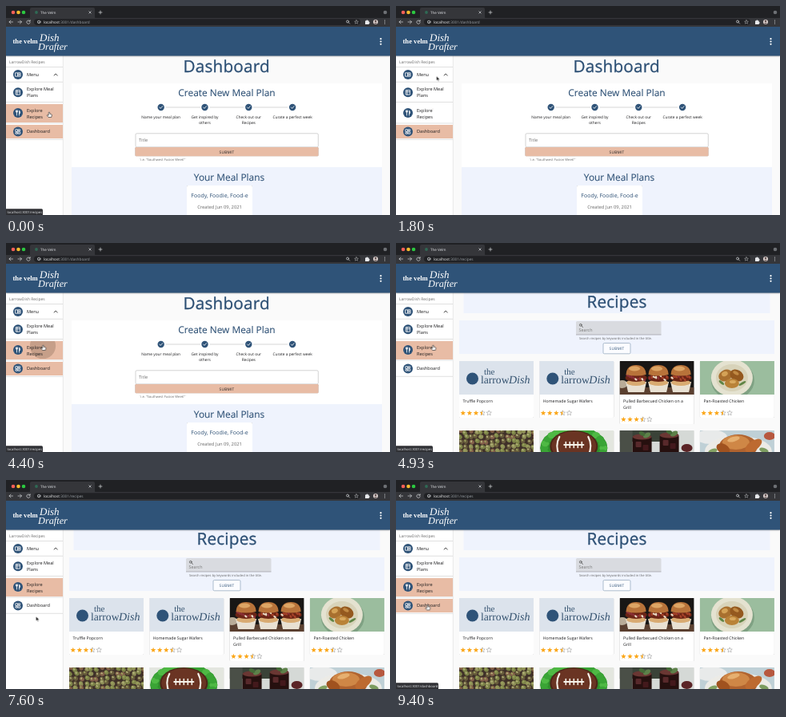
These frames come from a looping animation (480x262 px, 9.99 s). An HTML page:

```html
<!DOCTYPE html>
<html lang="en">
<head>
<meta charset="utf-8">
<title>Meal plan dashboard</title>
<style>
html, body { margin: 0; width: 100%; height: 100%; overflow: hidden; background: #fafafa; }
#stage { display: block; width: 100vw; height: 100vh; }
text { font-family: "Open Sans", "Noto Sans", sans-serif; font-size: 5px; fill: #1c1c1e; text-rendering: geometricPrecision; white-space: pre; }
.mid { text-anchor: middle; }
.h1 { font-size: 20.7px; letter-spacing: .2px; fill: #2c4f74; stroke: #2c4f74; stroke-width: .3px; }
.h2 { font-size: 11.9px; fill: #2c4f74; stroke: #2c4f74; stroke-width: .1px; }
.nav text { font-size: 5.6px; font-weight: 500; }
.nav .note { font-size: 4.9px; font-weight: 400; fill: #666; }
.step { font-size: 4.85px; font-weight: 500; }
.small { font-size: 4.1px; fill: #666; }
.btn { font-size: 4.8px; letter-spacing: .22px; font-weight: 500; }
.card { font-size: 5.2px; font-weight: 500; }
.serif { font-family: "Liberation Serif", "Noto Serif", serif; }
.script { font-family: "Liberation Serif", "Noto Serif", serif; font-style: italic; }
.url { font-size: 4.75px; fill: #9aa0a6; }
.url tspan { fill: #f1f3f4; }
.peach { fill: #e8bca5; }
.blue { fill: #2f5378; }
.white { fill: #fff; }
.pale { fill: #eff3fd; }
.line { fill: none; stroke-linecap: round; stroke-linejoin: round; }
.shade { filter: drop-shadow(0 .5px .7px #0005); }
</style>
</head>
<body>
<svg id="stage" viewBox="0 0 480 262" preserveAspectRatio="none">
  <defs>
    <path id="star" d="M0-4 1.1-1.3 4-1.1 1.8.8 2.5 3.7 0 2.1-2.5 3.7-1.8.8-4-1.1-1.1-1.3Z"/>
    <clipPath id="half"><path d="M-5-5H0V5H-5Z"/></clipPath>
    <clipPath id="item"><path d="M0 123H71V146H0Z"/></clipPath>
  </defs>

  <rect width="480" height="262" fill="#fafafa"/>

  <g class="dash">
    <text class="h1 mid" x="275.7" y="82.5">Dashboard</text>
    <g class="shade"><rect class="white" x="82" y="97" width="388" height="170"/></g>
    <rect class="pale" x="82" y="202" width="388" height="60"/>
    <text class="h2 mid" x="276" y="112.5">Create New Meal Plan</text>
    <path d="M200 127H243M255 127H297M309 127H352" stroke="#bdbdbd" stroke-width=".6"/>
    <g id="steps"></g>
    <rect class="white" x="162" y="159.8" width="228.3" height="17" rx="1.5" stroke="#b5b5b5" stroke-width=".6"/>
    <text x="166" y="170" style="font-size:5.6px;fill:#6d6d6d">Title</text>
    <g class="shade"><rect class="peach" x="161.5" y="177" width="229" height="11.3" rx="1.2"/></g>
    <text class="btn mid" x="276" y="184.6">SUBMIT</text>
    <text class="small" x="166" y="193.6">`i.e. "Southwest Fusion Week"`</text>
    <text class="h2 mid" x="279" y="218.5">Your Meal Plans</text>
    <g class="shade"><rect class="white" x="226" y="225" width="82" height="45" rx="1.5"/></g>
    <text class="mid" x="267" y="240" style="font-size:7px;fill:#2c4f74">Foody, Foodie, Food-e</text>
    <text class="mid" x="267" y="254" style="font-size:5.8px;fill:#666">Created Jun 09, 2021</text>
  </g>

  <g class="recipes">
    <rect class="pale" x="84.5" y="62" width="383" height="26"/>
    <text class="h1 mid" x="276" y="81">Recipes</text>
    <rect class="pale" x="79" y="97" width="394" height="42"/>
    <path d="M225 115V99.5Q225 98 226.5 98H330Q331.5 98 331.5 99.5V115Z" fill="#d9dbe0"/>
    <path d="M225 115H331.5" stroke="#8d8f94" stroke-width=".6"/>
    <g class="line" stroke="#555" stroke-width=".8"><circle cx="230.8" cy="102.8" r="1.4"/><path d="M232 104 233.6 105.6"/></g>
    <text x="228.5" y="110.8" style="font-size:5.4px;fill:#777">Search</text>
    <text class="small" x="229" y="120.7">Search recipes by keywords included in the title.</text>
    <rect x="259" y="125.5" width="34" height="13.3" rx="1.5" fill="#fbfcff" stroke="#8fa4b9" stroke-width=".7"/>
    <text class="btn mid" x="276" y="133.8" style="fill:#2f5378">SUBMIT</text>
    <g id="cards"></g>
  </g>

  <g class="nav">
    <rect class="white" y="60" width="71" height="202"/>
    <path d="M71.3 60V262" stroke="#ddd" stroke-width=".6"/>
    <text class="note" x="4" y="72">LarrowDish Recipes</text>
    <path d="M0 76.5H71M0 95.3H71M0 120.5H71M0 147H71M0 167.3H71" stroke="#d3d3d3" stroke-width=".7"/>
    <rect class="peach hoverPlans" y="97" width="71" height="22.5"/>
    <rect class="peach hoverRecipes" y="123" width="71" height="23"/>
    <rect class="peach hoverDash" y="149" width="71" height="17"/>
    <g clip-path="url(#item)"><circle class="ripple" cx="46" cy="129" fill="#6b5340"/></g>
    <g id="icons"></g>
    <text x="26" y="88">Menu</text>
    <text x="26" y="106">Explore Meal</text><text x="26" y="114">Plans</text>
    <text x="26" y="132.5">Explore</text><text x="26" y="140.5">Recipes</text>
    <text x="26" y="159.2">Dashboard</text>
    <path class="line" d="M60.2 87 62.2 85 64.2 87" stroke="#222" stroke-width=".9"/>
  </g>

  <g style="filter:drop-shadow(0 .6px 1px #0007)"><rect class="blue" y="25" width="480" height="37.5"/></g>
  <text class="serif white" x="8.5" y="47" style="font-size:8.6px;font-weight:bold;fill:#fff">the velm</text>
  <g style="--ink:#fff">
    <text class="script" x="42" y="44" style="font-size:13px;fill:#fff">Dish</text>
    <text class="script" x="40" y="54.8" style="font-size:12.3px;fill:#fff">Drafter</text>
  </g>
  <g class="white"><circle cx="468.5" cy="41.2" r="1.1"/><circle cx="468.5" cy="44.5" r="1.1"/><circle cx="468.5" cy="47.8" r="1.1"/></g>

  <g>
    <rect width="480" height="16" fill="#202124"/>
    <path d="M28 16Q30 16 30 14V4Q30 2 32 2H109Q111 2 111 4V14Q111 16 113 16Z" fill="#35363a"/>
    <rect y="15" width="480" height="11" fill="#35363a"/>
    <circle cx="9" cy="8" r="2.3" fill="#f45f57"/><circle cx="15.5" cy="8" r="2.3" fill="#f8bd2e"/><circle cx="22" cy="8" r="2.3" fill="#2bc840"/>
    <circle cx="38" cy="8" r="1.9" fill="#2f6a55"/>
    <text x="43" y="9.9" style="font-size:4.5px;fill:#e8eaed">The Velm</text>
    <circle cx="474" cy="8" r="2.3" fill="#6d7074"/>
    <rect x="35" y="16.3" width="408" height="7.6" rx="3.8" fill="#202124"/>
    <g class="line" stroke="#d6d8db" stroke-width=".7">
      <path d="M103.8 6.8 106.2 9.2M106.2 6.8 103.8 9.2M116 8H120M118 6V10M8.5 20H4M6 18 4 20 6 22"/>
      <path d="M15 20H19.5M17.5 18 19.5 20 17.5 22"/>
      <path d="M29.7 18.7A2.2 2.2 0 1 0 30.2 20.7M30.2 17.7V19.2H28.7"/>
      <circle cx="41.2" cy="20" r="1.8"/><path d="M41.2 20V21"/>
      <circle cx="427" cy="19.5" r="1.5"/><path d="M428.2 20.7 429.6 22.1"/>
      <use href="#star" transform="translate(438 20)scale(.6)"/>
    </g>
    <text class="url dash" x="47" y="21.8"><tspan>localhost</tspan>:3001/dashboard</text>
    <text class="url recipes" x="47" y="21.8"><tspan>localhost</tspan>:3001/recipes</text>
    <path d="M449 18.5H450.4A1 1 0 0 1 452.4 18.5H453.7V20A1 1 0 0 1 453.7 22V23H449Z" fill="#e8eaed"/>
    <circle cx="462" cy="20" r="3" fill="#d9cfcc"/><path d="M460 22.2Q462 19.8 464 22.2Z" fill="#5b4a4a"/><circle cx="462" cy="19" r="1.2" fill="#5b4a4a"/>
    <g fill="#d6d8db"><circle cx="473.5" cy="18" r=".6"/><circle cx="473.5" cy="20" r=".6"/><circle cx="473.5" cy="22" r=".6"/></g>
  </g>

  <g id="status"></g>

  <g class="cursor">
    <path class="hand" d="M-.8.5Q0-.5.8.5V2.3L2.8 2.8Q3.5 3 3.3 4L2.7 6.5H-1L-2.8 4.2Q-2.6 3.2-1.7 3.8L-.8 4.3Z" fill="#fff" stroke="#222" stroke-width=".6"/>
    <path class="arrow" d="M0 0V5.6L1.3 4.5 2.2 6.4 3.1 6 2.3 4.2H4Z" fill="#111" stroke="#fff" stroke-width=".5"/>
  </g>
</svg>

<script>
const LOOP = 9990;
const $ = id => document.getElementById(id);
const sheet = document.head.appendChild(document.createElement("style"));

// keys: [ms, declarations]
function animate(name, keys, easing = "linear") {
  const body = keys.map(([t, css]) => `${(t / LOOP * 100).toFixed(3)}%{${css}}`).join("");
  sheet.textContent += `@keyframes ${name}{${body}}.${name}{animation:${name} ${LOOP}ms ${easing} infinite}`;
}

// Visible in each [from, to) span
function show(name, ...spans) {
  const keys = [[0, "opacity:0"]];
  for (const [from, to] of spans) {
    if (from === 0) keys.pop();
    keys.push([from, "opacity:1"], [to, `opacity:${to === LOOP ? 1 : 0}`]);
  }
  if (keys.at(-1)[0] < LOOP) keys.push([LOOP, "opacity:0"]);
  animate(name, keys, "step-end");
}

show("dash", [0, 4600]);
show("recipes", [4600, LOOP]);
show("hoverPlans", [200, 1130], [1930, 2060]);
show("hoverRecipes", [0, 200], [2060, LOOP]);
show("hoverDash", [0, 4600], [6670, 6870], [8470, LOOP]);
show("statusRecipes", [0, 330], [2470, 7070]);
show("statusPlans", [330, 1400]);
show("statusDash", [8600, LOOP]);
show("hand", [0, 1060], [1930, 6870], [8470, LOOP]);
show("arrow", [1060, 1930], [6870, 8470]);

const path = [
  [0, 54, 133], [70, 54, 133], [300, 55, 115], [530, 55, 107], [730, 55, 107],
  [1070, 53, 96], [1400, 52, 80], [1670, 51, 79], [1730, 51, 79], [2060, 49, 120],
  [2330, 46.5, 132], [3070, 46.5, 132], [3400, 45, 126], [3700, 48, 131],
  [4000, 46.5, 128], [6470, 46.5, 128], [6600, 40.5, 146.5], [6870, 38, 166],
  [7130, 37.5, 171], [8300, 37.5, 171], [8530, 39.5, 159], [8800, 39.5, 156.5], [LOOP, 39.5, 156.5]
];
animate("cursor", path.map(([t, x, y]) => [t, `transform:translate(${x}px,${y}px)`]));
animate("ripple", [
  [0, "r:0;opacity:0"], [4200, "r:2px;opacity:.27"], [4400, "r:16px;opacity:.27"],
  [4600, "r:40px;opacity:.2"], [4900, "r:50px;opacity:0"], [LOOP, "r:0;opacity:0"]
]);

const text = (x, y, s, cls) => `<text x="${x}" y="${y}" class="${cls}">${s}</text>`;
const rect = (x, y, w, h, fill, more = "") => `<rect x="${x}" y="${y}" width="${w}" height="${h}" fill="${fill}" ${more}/>`;
const oval = (x, y, rx, ry, fill, turn = 0) =>
  `<ellipse cx="${x}" cy="${y}" rx="${rx}" ry="${ry}" fill="${fill}" transform="rotate(${turn} ${x} ${y})"/>`;
const stroke = (d, color, width) => `<path class="line" d="${d}" stroke="${color}" stroke-width="${width}"/>`;
const each = (n, f) => Array.from({ length: n }, (_, i) => f(i)).join("");

let seed = 7;
const rnd = () => (seed = seed * 16807 % 2147483647) / 2147483647;
const pick = list => list[Math.floor(rnd() * list.length)];

// Stepper
$("steps").innerHTML = [
  ["Name your meal plan"], ["Get inspired by", "others"], ["Check out our", "Recipes"], ["Curate a perfect week"]
].map((lines, i) => {
  const x = 193.7 + i * 54.8;
  return `<circle class="blue" cx="${x}" cy="127" r="4.2"/>` +
    stroke(`M${x - 1.8} 127l1.3 1.4 2.5-2.8`, "#fff", .8) +
    lines.map((s, j) => text(x, 141 + j * 7, s, "step mid")).join("");
}).join("");

// Sidebar icons
const glyphs = [
  [86, "M-3-2.2H-.3V2.2H-3ZM.3-2.2H3V2.2H.3ZM1-.8H2.3M1 .6H2.3"],
  [108.3, "M-2.4-2.8H2.4V2.8H-2.4ZM-2.4-.7H2.4M-1-2.8V2.8"],
  [134, "M-1.5-3V3M-2.5-3V-1Q-1.5.5-.5-1V-3M1.5 3V-3Q3-2 2.5.5H1.5"],
  [157.5, "M-2.7-2.7H-.5V0H-2.7ZM.6-2.7H2.7V-1H.6ZM-2.7 1.2H-.5V2.7H-2.7ZM.6.3H2.7V2.7H.6Z"]
];
$("icons").innerHTML = glyphs.map(([y, d]) =>
  `<g transform="translate(15 ${y})"><circle class="blue" r="6"/>${stroke(d, "#fff", .8)}</g>`).join("");

// Status bubbles
$("status").innerHTML = [["Recipes", "recipes", 46], ["Plans", "meal_plans", 54], ["Dash", "dashboard", 53]]
  .map(([name, page, w]) => `<g class="status${name}"><path d="M0 254.3H${w - 1.5}Q${w} 254.3 ${w} 256V262H0Z" fill="#303135"/>` +
    `<text x="1.5" y="260" style="font-size:4.2px;fill:#e4e6e9">localhost:3001/${page}</text></g>`).join("");

// Recipe pictures, drawn in a 93 by 42 box
const brand = () => rect(0, 0, 93, 42, "#dce3ec") +
  `<circle class="blue" cx="16.5" cy="22" r="7.5"/>` +
  `<text class="serif" x="31" y="17" style="font-size:11px;fill:#34526f">the</text>` +
  `<text class="serif" x="27" y="28" style="font-size:13.6px;fill:#34526f">larrow</text>` +
  `<text class="script" x="62" y="28" style="font-size:14px;fill:#34526f">Dish</text>`;

const sliders = () => rect(0, 0, 93, 42, "#181615") + rect(0, 33, 93, 9, "#5b4030") +
  oval(3, 29, 7, 5, "#b9ac98") +
  each(3, i => {
    const x = 20.5 + i * 28;
    return `<path d="M${x - 13} 26H${x + 13}L${x + 10} 39H${x - 10}Z" fill="#e9e1d3"/>` +
      oval(x, 27, 12, 4, "#d9ab72") + oval(x, 21, 13.5, 5, "#6b2415") +
      each(9, j => oval(x - 11 + j * 2.7, 18 + rnd() * 6, 2, 1.2, pick(["#ead9c4", "#a8432a", "#8c2f38"]), rnd() * 90)) +
      `<path d="M${x - 12.5} 17Q${x - 12} 5 ${x} 5T${x + 12.5} 17Q${x} 20 ${x - 12.5} 17Z" fill="#b8733a"/>` +
      oval(x - 2, 9.5, 7, 3, "#dda565");
  });

const roast = () => rect(0, 0, 93, 42, "#9bbd9e") + oval(41, 24, 27, 24, "#7fa183") +
  oval(40, 21, 26, 23, "#e4e2d0") + oval(40, 21, 20, 17, "#d8d3ba") +
  oval(32, 18, 9, 7, "#a9702f", -25) + oval(46, 18, 9, 7, "#94591f", 30) + oval(40, 28, 9, 6, "#b98238") +
  oval(31, 16, 4, 3, "#d4a257", -25) + oval(45, 15, 4, 2, "#c18a44", 30) + oval(41, 26, 4, 2, "#d9a95f") +
  oval(27, 27, 4, 1.5, "#5f8444", 40) + oval(53, 28, 5, 1.5, "#5f8444", -30);

const sprouts = () => rect(0, 0, 93, 42, "#3f3029") + each(75, i => {
  const x = i % 15 * 6.6 + rnd() * 3, y = Math.floor(i / 15) * 6 + rnd() * 3;
  return oval(x, y, 3.2, 2.7, pick(["#7d8448", "#8f9058", "#675b3c", "#84604a"]), rnd() * 90) +
    oval(x - .7, y - .8, 1.4, 1, pick(["#b3b07a", "#9aa25c"]), rnd() * 90);
});

const football = () => rect(0, 0, 93, 42, "#e3e6df") + oval(43, 22, 42, 27, "#2f8f2c") +
  each(26, i => oval(43 + 37 * Math.cos(i / 26 * 6.283), 22 + 24 * Math.sin(i / 26 * 6.283), 5, 4, pick(["#4fb944", "#3aa435"]))) +
  oval(43, 20, 30, 20, "#4b2418") + oval(43, 19.5, 28, 18.5, "#6a3423") +
  stroke("M25 8Q19 19 25 32M61 8Q67 19 61 32M31 18H55", "#f5f2e9", 2.2) +
  each(5, i => stroke(`M${33 + i * 5} 14.5V21.5`, "#f5f2e9", 1.6));

const drinks = () => rect(0, 0, 93, 42, "#d5d9d6") + rect(0, 0, 60, 14, "#3a4238") + rect(0, 0, 16, 42, "#4a4f47") +
  [[28, 6], [62, 4]].map(([x, y]) =>
    rect(x - 12, y, 24, 34, "#26100f", 'rx="4"') + oval(x, y + 2, 12, 3.5, "#6a3733") +
    rect(x - 8, y + 8, 7, 7, "#58292b", 'rx="1"') + rect(x + 1, y + 12, 7, 7, "#43191c", 'rx="1"') +
    oval(x + 6, y, 5, 3, "#5d8149", -30) + oval(x, y - 2, 4, 2.5, "#456b38", 25)).join("") +
  oval(84, 22, 7, 5, "#5b2426");

const chicken = () => rect(0, 0, 93, 42, "#bfd0d6") + oval(14, 8, 20, 9, "#e8eaea") +
  oval(48, 26, 42, 19, "#ecebe6") + oval(48, 20, 24, 15, "#b0632f") + oval(45, 15, 17, 9, "#cf8746") +
  oval(67, 19, 12, 6, "#bd6a30", -35) + oval(29, 23, 9, 6, "#a0521f", 30) + oval(42, 11, 8, 3, "#e6b070", -15) +
  oval(80, 25, 6, 3, "#7c9c60", 20) + oval(16, 26, 6, 3, "#84a264", -20) + oval(87, 7, 7, 5, "#b7583f");

const stars = (x, y) => each(5, i => {
  const at = `transform="translate(${x + i * 8.1} ${y})scale(.8)"`;
  if (i < 3) return `<use href="#star" ${at} fill="#fba81c"/>`;
  const outline = `<use href="#star" ${at} fill="none" stroke="#8a8a8a" stroke-width=".6"/>`;
  return outline + (i === 3 ? `<g ${at}><use href="#star" clip-path="url(#half)" fill="#fba81c"/></g>` : "");
});

const cards = [
  [brand, "Truffle Popcorn"], [brand, "Homemade Sugar Wafers"],
  [sliders, "Pulled Barbecued Chicken on a", "Grill"], [roast, "Pan-Roasted Chicken"],
  [sprouts], [football], [drinks], [chicken]
];
$("cards").innerHTML = cards.map(([picture, ...lines], i) => {
  const x = 79 + i % 4 * 100.3, y = i < 4 ? 148 : 235, extra = lines.length > 1 ? 8 : 0;
  return `<g class="shade">${rect(x, y, 93, 71 + extra, "#fff", 'rx="1.5"')}</g>` +
    `<svg x="${x}" y="${y}" width="93" height="42">${picture()}</svg>` +
    lines.map((s, j) => text(x + 4.5, y + 52 + j * 8, s, "card")).join("") +
    stars(x + 4.8, y + 65 + extra);
}).join("");
</script>
</body>
</html>
```
